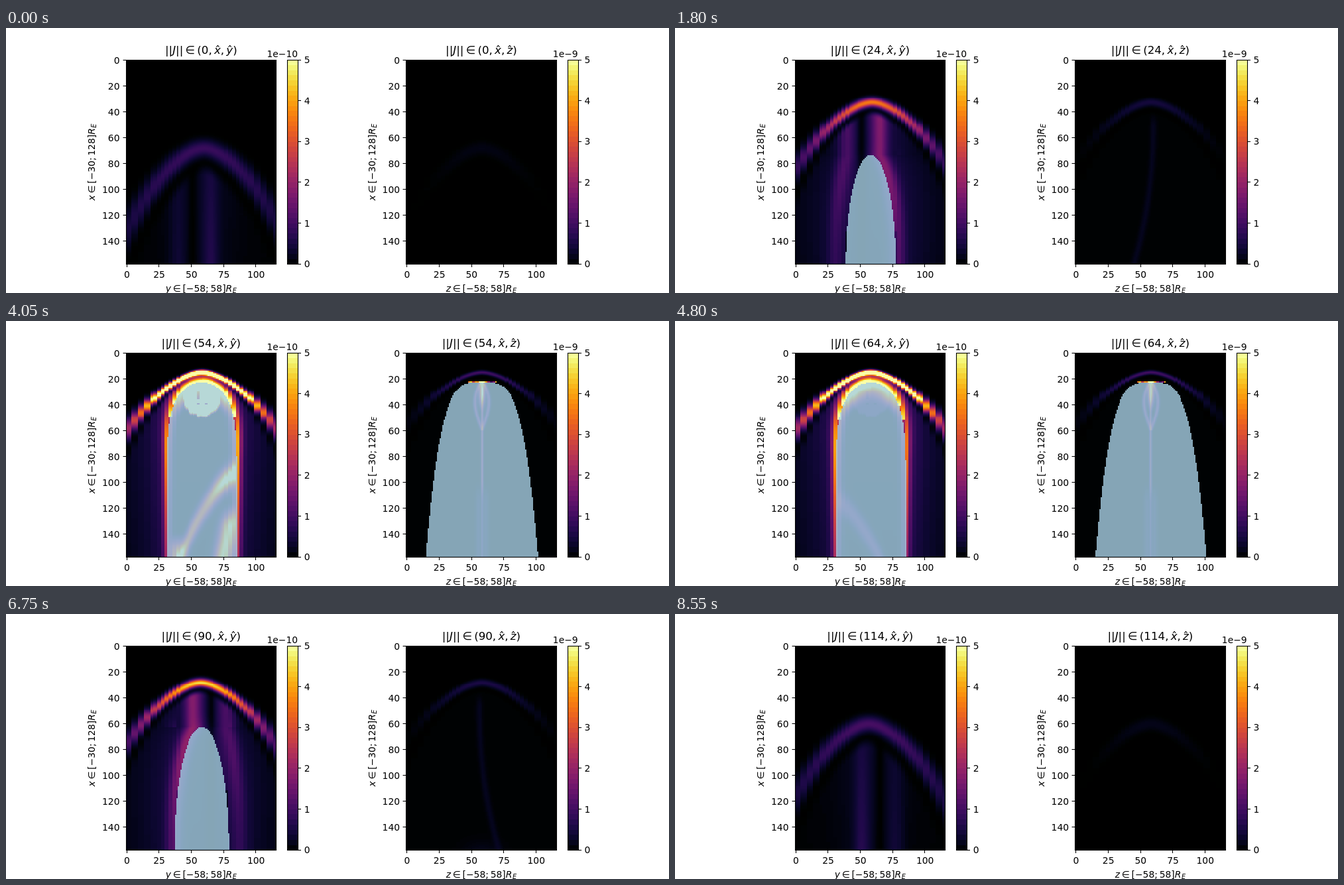
An HTML page with a canvas for the animation above (8700 ms loop, 1000 by 400 pixels).

```html
<!DOCTYPE html>
<html lang="en">
<head>
<meta charset="utf-8">
<title>Current density slices</title>
<style>
html, body { margin: 0; width: 100%; height: 100%; overflow: hidden; background: #fff; }
#stage { position: relative; width: 1000px; height: 400px; overflow: hidden; }
canvas { position: absolute; top: 48px; height: 308px; image-rendering: pixelated; }
#xy { left: 181px; width: 226px; }
#xz { left: 603px; width: 227px; }
svg { position: absolute; left: 0; top: 0; }
text { font: 13.89px "DejaVu Sans", sans-serif; fill: #000; white-space: pre; }
.title { font-size: 16.67px; }
.it { font-style: italic; }
.sub { font-size: 9.72px; }
</style>
</head>
<body>
<div id="stage">
  <canvas id="xy" width="116" height="158"></canvas>
  <canvas id="xz" width="116" height="158"></canvas>
  <svg id="axes" width="1000" height="400" viewBox="0 0 1000 400"></svg>
</div>
<script>
const COLS = 116, ROWS = 158, STEP = 150, FRAMES = 58, MID = 29, SHOCK_MID = 29.6, CENTRE = 58.7;
const { abs, exp, sin, sqrt, min, max, pow, floor, round, hypot, PI } = Math;
const clamp = v => min(1, max(0, v));
const smooth = (a, b, v) => { const t = clamp((v - a) / (b - a)); return t * t * (3 - 2 * t); };
const bell = (v, w) => exp(-(v / w) * (v / w));
const noise = (a, b) => { const h = sin(a * 12.99 + b * 78.23) * 43758.5; return h - floor(h); };

// Polynomial fit of the inferno colour map
const FIT = [
  [0.0002, 0.1065, 11.6025, -41.7040, 77.1629, -71.3194, 25.1311],
  [0.0017, 0.5640, -3.9729, 17.4364, -33.4024, 32.6261, -12.2427],
  [-0.0195, 3.9327, -15.9424, 44.3541, -81.8073, 73.2095, -23.0703]
];
const inferno = t => FIT.map(c => 255 * clamp(c.reduceRight((s, k) => s * t + k, 0)));
const LUT = Array.from({ length: 256 }, (_, i) => inferno(i / 255));
const VEIL = [166, 206, 227], ALPHA = 0.8;

// The simulation mesh gets coarser away from the centre line
function snap(d) {
  const a = abs(d), s = d < 0 ? -1 : 1;
  if (a < 17) return d;
  if (a < 38) return s * (floor((a + 1) / 3) * 3 + 0.5);
  return s * (floor(a / 5) * 5 + 2.5);
}

// Bow shock: signed depth below the front, in units of its thickness
function shockDepth(d, y, apex, curve, sigma) {
  const a = abs(d) / 30;
  const slope = curve * 0.0573 * pow(a, 0.72);
  const thick = hypot(0.9 * sigma * sqrt(1 + slope * slope), 2 * a * a);
  return (y - apex - curve * pow(a, 1.72)) / thick;
}

function timeState(n) {
  const del = abs(n - MID), shock = abs(n - SHOCK_MID);
  const apex = 15 + 0.0435 * pow(shock, 2.1);
  return {
    n, del, shock, apex,
    skew: (MID - n) / MID,
    side: n <= MID ? 1 : -1,
    far: clamp((del - 18) / 10),
    core: exp(-pow(del / 7, 4)),
    curve: 12.6 + 0.096 * apex
  };
}

function sliceXY(s) {
  const { n, del, shock, apex, side, far } = s;
  const m = 23 + 0.00061 * pow(del, 4);
  const W = max(3, 27 - 0.0000922 * pow(del, 4));
  const p = 2 + 6 * bell(del, 8);
  const open = m < ROWS, len = ROWS - m;
  const half = y => !open || y <= m ? 0 : W * sqrt(1 - pow(1 - min(1, (y - m) / len), p));

  // Approximate distance to the boundary, negative inside
  function gap(d, y) {
    if (!open) return 99;
    const a = abs(d), h = a - half(y);
    if (a >= W) return y < m ? hypot(a - W, m - y) : h;
    const v = m + len * (1 - pow(1 - (a / W) ** 2, 1 / p)) - y;
    if (y <= m) return v;
    return (h < 0 ? -1 : 1) * abs(h * v) / (hypot(h, v) + 1e-6);
  }

  const sigma = 1.8 + 0.0058 * shock * shock;
  const peak = 0.75 + 8.5 * exp(-pow(shock / 17, 2.5));
  const reach = 48 + max(0, apex - 33) * 0.8;
  const glow = 5.6 * exp(-pow(del / 12.8, 5));
  const fall = 45 + 85 * bell(del, 8);
  const width = 3.4 + 2 * clamp(del / 11);
  const weak = 1 - 0.35 * clamp(del / 11);
  const streak = 0.2 + bell(del - 16, 7);
  const blob = exp(-pow((n - 27) / 4, 4));
  const plume = bell(n - 28, 4);
  const shift = n > MID ? 22 : 0;

  function value(d0, y) {
    const d = snap(d0), q = d * side, h = half(y), e = gap(d, y);
    const depth = shockDepth(d - 1.6 * s.skew, y, apex, s.curve, sigma);
    const below = smooth(1.6, 3.6, depth);
    let v = peak * bell(d, reach) * bell(depth, 1);

    let base = (0.2 + 0.5 * bell(max(0, abs(d) - h), 25)) * (1 - 0.55 * far) * (1 - 0.4 * y / ROWS);
    if (e < 0) base *= 0.3;
    const hole = 1 - 0.85 * bell(q + 7, 4) * smooth(10, 14, del);
    const grow = (1 + far * (y / 79 - 1)) * (1 - 0.35 * (1 - far) * smooth(80, 150, y));
    const lines = bell(q - hypot(7, h), 6) + 0.55 * bell(q + hypot(19, h + 1), 6);
    v += below * (base * hole + streak * grow * lines * hole);

    if (open && depth > 0) {
      const cap = s.core * (1 - smooth(10, 28, y - m));
      const reachOut = width * (1.25 - 0.45 * clamp((y - m) / 60));
      const near = e > 0 ? exp(-pow(e / reachOut, 1.5)) : (0.5 + 0.5 * cap) * bell(e, 3.5 + 4 * cap);
      v += glow * near * (q > 0 ? 1 : weak) * exp(-max(0, y - m) / fall);
    }
    if (e < 0 && blob > 0.01) {
      const r = hypot(d / 14, (y - 35) / 14) + 0.14 * (noise(floor(d / 2), 3) - 0.5);
      let b = 6 * blob * (1 - smooth(0.9, 1.1, r));
      if (abs(d) < 4 && y > 27 && y < 40 && noise(floor(d / 2), floor(y / 3)) > 0.68) b *= 0.25;
      v += b;
    }
    if (e < 0 && plume > 0.01) {
      const path = 124 + shift - 1.75 * q + 0.02 * q * q;
      const fade = n > MID ? 0.5 : 0.6 + 0.4 * smooth(0, 20, q);
      v += plume * fade * 5.5 * bell(y - path, 8.5);
      if (!shift) {
        v += plume * 5 * bell(q - 20 + (y - 140) * 0.2, 6) * smooth(115, 135, y);
        v += plume * 3.5 * bell(q + 19, 6) * smooth(138, 156, y);
      }
    }
    return v;
  }
  return { value, veiled: (d, y) => open && y > m && abs(d) < half(y) };
}

function sliceXZ(s) {
  const { del, shock, apex, side, core } = s;
  const k = del / 11;
  const m = 23 + 28 * pow(k, 4.5);
  const W = max(4, 43.5 - 12 * k * k);
  const power = 0.25 + 0.15 * k * k;
  const open = m < ROWS;
  const half = y => !open || y <= m ? 0 : W * pow((y - m) / (ROWS - m), power);

  const sigma = 1.6 + 0.0055 * shock * shock;
  const peak = 0.05 + bell(shock, 19);
  const halo = 0.8 * bell(del - 11, 4);
  const sheet = 2.3 * (1 - smooth(9, 16, del));
  const trail = 0.16 * bell(del - 16, 5);

  function value(d0, y) {
    const d = snap(d0);
    const depth = shockDepth(d, y, apex, s.curve * 0.9, sigma);
    let v = peak * bell(d, 38) * bell(depth, 1);
    v += 0.05 * smooth(1.6, 3.6, depth) * (1 - s.far);

    if (depth > 1.5) {
      v += halo * bell(d, 14) * bell(y - m + 10, 11);
      const start = m - 13 * clamp((del - 4) / 7);
      const tail = smooth(98, 118, y), x = d - 2.4 * s.skew;
      v += sheet * smooth(start, start + 6, y) * bell(x, 0.9) * (1 - 0.6 * tail);
      v += 0.15 * sheet * tail * bell(abs(x) - 3, 2);
      const bend = 2 - 15 * pow(max(0, y - 50) / 108, 2);
      v += trail * bell(d - bend * side, 2.5) * smooth(apex + 6, apex + 20, y);
    }
    if (core > 0.01 && y > 22 && y < 60) {
      const w = 5.5 * sin(PI * pow((y - 22) / 38, 0.8));
      v += core * 1.5 * bell(abs(d) - w, 1.2);
      v += core * 4.2 * bell(d, 2.4) * (1 - smooth(30, 47, y));
      if (y < m && y > m - 1 && abs(d) < 11) v += core * (1 + 4 * noise(floor(d / 2), 7));
    }
    return v;
  }
  return { value, veiled: (d, y) => open && y > m && abs(d) < half(y) };
}

function paint(id, slice) {
  const ctx = document.getElementById(id).getContext("2d");
  const img = ctx.createImageData(COLS, ROWS);
  let o = 0;
  for (let j = 0; j < ROWS; j++) {
    for (let i = 0; i < COLS; i++, o += 4) {
      const d = i + 0.5 - CENTRE, y = j + 0.5;
      const rgb = LUT[floor(255 * clamp(slice.value(d, y) / 5))];
      const mix = slice.veiled(d, y) ? ALPHA : 0;
      for (let c = 0; c < 3; c++) img.data[o + c] = rgb[c] * (1 - mix) + VEIL[c] * mix;
      img.data[o + 3] = 255;
    }
  }
  ctx.putImageData(img, 0, 0);
}

// Axes and labels
const GAP = 'dx=".195em"';
const it = c => `<tspan class="it">${c}</tspan>`;
const hat = c => `<tspan class="it" ${GAP}>${c}</tspan><tspan dx="-.52em">\u02c6</tspan>`;
const rel = `<tspan ${GAP}>∈</tspan>`;
const line = (x1, y1, x2, y2) => `<path d="M${x1} ${y1}L${x2} ${y2}" stroke="#000" stroke-width="1.1"/>`;
const text = (x, y, s, anchor, more = "") => `<text x="${x}" y="${y}" text-anchor="${anchor}" ${more}>${s}</text>`;
const range = (name, a, b) => it(name) + rel +
  `<tspan ${GAP}>[−${a};</tspan><tspan ${GAP}>${b}]</tspan>` +
  it("R") + '<tspan class="sub it" dx=".05em" dy="2">E</tspan>';

function frame(x, w) {
  const a = floor(x) + 0.5, b = round(x + w) + 0.5;
  return `<rect x="${a}" y="48.5" width="${b - a}" height="308" fill="none" stroke="#000" stroke-width="1.1"/>`;
}

function axes(x0, name, power) {
  const mid = x0 + 113.1, bar = x0 + 243.3, left = floor(x0) + 0.5, edge = round(bar + 15.6) + 0.5;
  let out = "";
  for (let v = 0; v <= 140; v += 20) {
    const y = 48 + (v + 0.5) * 1.949;
    out += line(left - 5, floor(y) + 0.5, left, floor(y) + 0.5) + text(x0 - 9.7, y + 5, v, "end");
  }
  for (let v = 0; v <= 100; v += 25) {
    const x = x0 + (v + 0.5) * 1.948;
    out += line(floor(x) + 0.5, 356, floor(x) + 0.5, 361) + text(x + 0.2, 377.3, v, "middle");
  }
  const bands = 40, h = 308 / bands;
  for (let i = 0; i < bands; i++) {
    const rgb = inferno((i + 0.5) / bands).map(round);
    out += `<rect x="${floor(bar)}" y="${356 - (i + 1) * h}" width="16" height="${h + 0.3}" fill="rgb(${rgb})" shape-rendering="crispEdges"/>`;
  }
  for (let v = 0; v <= 5; v++) {
    const y = 356 - 61.6 * v;
    out += line(edge, floor(y) + 0.5, edge + 4.5, floor(y) + 0.5) + text(bar + 25.3, y + 5.2, v, "start");
  }
  out += frame(x0, 226.1) + frame(bar, 15.6);
  out += text(bar + 15.6, 44.3, "1e−" + power, "end");
  out += text(mid, 398, range(name, 58, 58), "middle");
  out += text(0, 0, range("x", 30, 128), "middle", `transform="translate(${x0 - 46.8} 202.5) rotate(-90)"`);
  out += text(mid, 39, "||" + it("J") + "||" + rel +
    `<tspan ${GAP}>(</tspan><tspan class="step">0</tspan>,` +
    hat("x") + '<tspan dx=".02em">,</tspan>' + hat(name) + '<tspan dx=".02em">)</tspan>', "middle", 'class="title"');
  return out;
}

document.getElementById("axes").innerHTML = axes(181.2, "y", 10) + axes(603.8, "z", 9);
const counters = document.querySelectorAll(".step");
let shown = -1;

function draw() {
  const n = floor(performance.now() / STEP) % FRAMES;
  if (n !== shown) {
    shown = n;
    const s = timeState(n);
    paint("xy", sliceXY(s));
    paint("xz", sliceXZ(s));
    counters.forEach(c => { c.textContent = 2 * n; });
  }
  requestAnimationFrame(draw);
}
draw();
</script>
</body>
</html>
```
